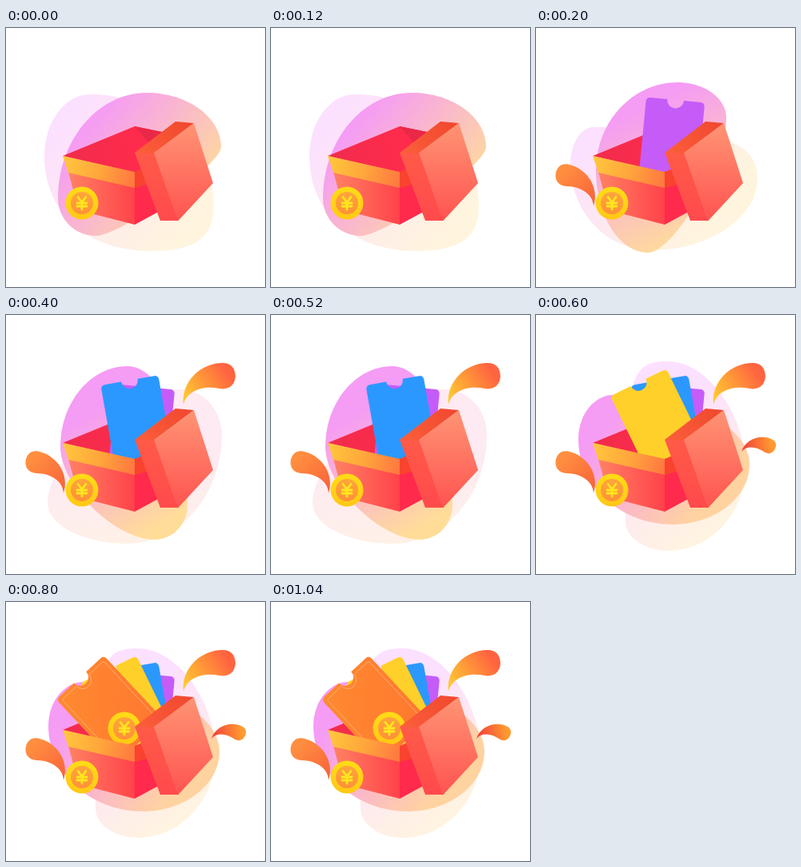
Recreate the animation shown at these times as an HTML page with a canvas. Size 324 by 324 pixels, loop 1.2 s.

```html
<!DOCTYPE html>
<html lang="en">
<head>
<meta charset="utf-8">
<title>Gift box</title>
<style>
  html, body { margin: 0; width: 100%; height: 100%; overflow: hidden; background: #fff; }
  canvas { display: block; width: 324px; height: 324px; }
</style>
</head>
<body>
<canvas id="stage" width="324" height="324"></canvas>
<script>
const ctx = document.getElementById('stage').getContext('2d');
const LOOP = 1200, STEP = 200, LAST = 4;

function ramp(x0, y0, x1, y1, ...colors) {
  const g = ctx.createLinearGradient(x0, y0, x1, y1);
  colors.forEach((c, i) => g.addColorStop(i / (colors.length - 1), c));
  return g;
}

function fill(path, style) {
  ctx.fillStyle = style;
  ctx.fill(typeof path === 'string' ? new Path2D(path) : path);
}

// Run paint() in a local frame; angle in degrees
function at(x, y, angle, sx, sy, paint) {
  ctx.save();
  ctx.translate(x, y);
  ctx.scale(sx, sy);
  ctx.rotate(angle * Math.PI / 180);
  paint();
  ctx.restore();
}

// Blob through its four extreme points; bulge sets how full each quarter is
// (left-top, top-right, right-bottom, bottom-left), 0.55 being an ellipse
function egg(left, top, right, bottom, style, bulge = []) {
  const ends = [left, top, right, bottom];
  const path = new Path2D();
  path.moveTo(...left);
  ends.forEach(([ax, ay], i) => {
    const [bx, by] = ends[(i + 1) % 4];
    const k = bulge[i] || 0.55, dx = (bx - ax) * k, dy = (by - ay) * k;
    if (i % 2) path.bezierCurveTo(ax + dx, ay, bx, by - dy, bx, by);
    else path.bezierCurveTo(ax, ay + dy, bx - dx, by, bx, by);
  });
  fill(path, style);
}

const PALE_PINK = '#fce0ff', PALE_CREAM = '#fff4de';
const PINK = '#f59cf4', PEACH = '#ffdd98';

const backdrops = [
  () => {
    egg([48, 160], [105, 83], [260, 222], [182, 279],
      ramp(70, 120, 220, 250, PALE_PINK, PALE_CREAM), [0.55, 0.55, 0.7, 0.6]);
    egg([65, 213], [176, 81], [269, 149], [112, 260],
      ramp(105, 120, 240, 230, PINK, PEACH), [0.55, 0.55, 0.2]);
  },
  () => {
    egg([43, 170], [72, 124], [277, 188], [143, 278],
      ramp(60, 150, 200, 260, PALE_PINK, PALE_CREAM), [0.55, 0.75]);
    egg([75, 178], [177, 68], [238, 112], [140, 281],
      ramp(110, 110, 190, 270, PINK, PEACH), [0.55, 0.55, 0.33]);
  },
  () => {
    egg([52, 235], [218, 93], [270, 150], [152, 286],
      ramp(180, 180, 195, 290, '#fdeaf3', '#fff1e6'), [0.4]);
    egg([68, 165], [152, 64], [227, 238], [186, 281],
      ramp(110, 120, 200, 260, PINK, PEACH), [0.55, 0.55, 0.55, 0.42]);
  },
  () => {
    egg([112, 258], [165, 58], [262, 190], [165, 295],
      ramp(120, 150, 210, 280, PALE_PINK, '#fff4e0'), [0.9, 0.5]);
    egg([53, 155], [97, 100], [267, 187], [171, 262],
      ramp(85, 140, 210, 240, PINK, '#ffd3a0'));
  }
];

// Ticket with rounded top corners and a round notch between them
function ticketPath(w, h, notch, inset) {
  const r = 5 - inset / 2;
  const p = new Path2D();
  p.moveTo(inset, h);
  p.arcTo(inset, inset, w / 2, inset, r);
  p.arc(w / 2, inset, notch, Math.PI, 0, true);
  p.arcTo(w - inset, inset, w - inset, h, r);
  p.lineTo(w - inset, h);
  p.closePath();
  return p;
}

function ticket(x, y, angle, w, color, lined) {
  const h = 110, notch = 10.5;
  at(x, y, angle, 1, 1, () => {
    fill(ticketPath(w, h, notch, 0), color);
    if (!lined) return;
    ctx.strokeStyle = 'rgba(255,210,160,.65)';
    ctx.lineWidth = 0.8;
    ctx.stroke(ticketPath(w, h, notch, 5));
  });
}

const tickets = [
  () => ticket(138, 86.5, 5.5, 73.5, '#c55cf8'),
  () => ticket(118.5, 88, -10, 73, '#2b98ff'),
  () => ticket(93, 101.5, -26, 78, '#ffd02a'),
  () => ticket(63, 122, -43, 81, ramp(0, 0, 80, 80, '#ff8a30', '#ff7a30'), true)
];

// Curved drop: pointed tail at (x, y), round head up and to the right
function drop(x, y, angle, sx, sy, tail, head) {
  at(x, y, angle, sx, sy, () => fill(
    'M0 0C-3-28 21-52 49-52C60-52 65-45 65-35C64-24 57-18 45-20C25-24 5-18 0 0Z',
    ramp(2, -8, 54, -42, tail, head)));
}

const drops = [
  () => drop(72, 223, -12.7, -0.85, 0.85, '#f9653a', '#ff8e40'),
  () => drop(222, 112, 0, 1, 1, '#ffc832', '#ff6440'),
  () => drop(257, 171, 24, 0.57, 0.57, '#f2433a', '#ff9a30')
];

function coin(x, y) {
  at(x, y, 0, 1, 1, () => {
    const disc = (r, from, to) => {
      const p = new Path2D();
      p.arc(0, 0, r, 0, 2 * Math.PI);
      fill(p, ramp(0, -r, 0, r, from, to));
    };
    disc(20.5, '#ffdc16', '#ffc814');
    disc(14, '#ffa63a', '#ff9038');
    ctx.strokeStyle = '#ffe61e';
    ctx.lineWidth = 2.8;
    ctx.stroke(new Path2D('M-5-7.500L0-1L5-7.500M0-1V8M-6 0H6M-6 4H6'));
  });
}

function inside() {
  fill('M71 160L161 123L200 131L190 170L161 181Z', ramp(80, 160, 165, 145, '#f22c4c', '#ff2b4c'));
  fill('M161 123L200 131L182 147Z', '#ea2848');
}

function front() {
  fill('M78 180L161 199V246L91 228Z', ramp(80, 0, 161, 0, '#ff8062', '#ff424a'));
  fill('M161 198L180 193L198 226L161 246Z', '#ff2a4c');
  fill('M71 160L161 180V200L78 181Z', ramp(74, 165, 161, 190, '#ffc53c', '#ffa63c', '#ff7840'));
  fill('M161 180L180 172V195L161 200Z', '#f9432f');
}

function lid() {
  fill('M161 156L186 156L216 241L193 241Z', ramp(0, 156, 0, 241, '#ff5a48', '#ff4a4c'));
  fill('M161 156L212 117L235 119L185 157Z', ramp(165, 155, 230, 118, '#fb5e3a', '#f0482f'));
  fill('M185 156L235 119L259 194L215 241.500Z', ramp(0, 119, 0, 241, '#ff9474', '#ff5450'));
}

function draw(step) {
  ctx.clearRect(0, 0, 324, 324);
  ctx.lineCap = 'round';
  ctx.lineJoin = 'round';
  backdrops[Math.min(step, 3)]();
  drops.slice(0, step).forEach(paint => paint());
  inside();
  tickets.slice(0, step).forEach(paint => paint());
  if (step === LAST) coin(148, 158);
  front();
  lid();
  coin(95, 219);
}

function tick() {
  const t = performance.now() % LOOP;
  draw(Math.min(LAST, Math.floor(t / STEP)));
  requestAnimationFrame(tick);
}
tick();
</script>
</body>
</html>
```
